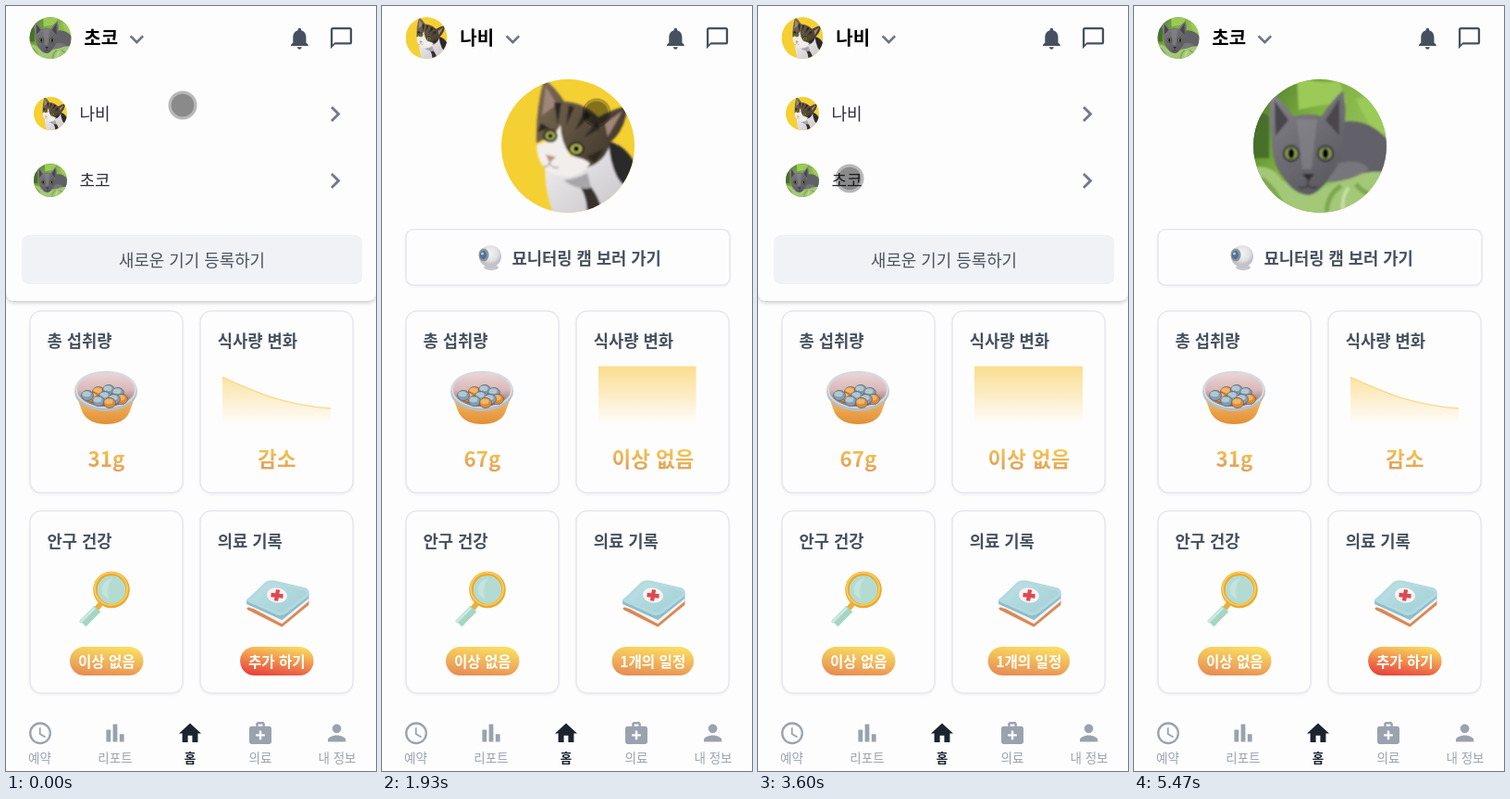
Recreate the animation shown at these times as an HTML page. Size 400 by 825 pixels, loop 6.74 s.

```html
<!DOCTYPE html>
<html lang="ko">
<head>
<meta charset="utf-8">
<title>고양이 홈</title>
<style>
  html, body { margin: 0; width: 100%; height: 100%; overflow: hidden; background: #fefdfe; }
  svg.stage { display: block; width: 100%; height: 100%; }
  text { font-family: "Noto Sans CJK KR", "Noto Sans KR", "Noto Sans CJK", sans-serif; }
  .bold { font-weight: 700; }
  .mid { text-anchor: middle; }
  .title { font-size: 17.7px; font-weight: 700; fill: #47505c; }
  .row { font-size: 18px; font-weight: 500; fill: #2b313a; }
  .value { font-size: 22.4px; font-weight: 700; text-anchor: middle; fill: url(#gold); }
  .pill { font-size: 15.6px; font-weight: 700; text-anchor: middle; fill: #fff; }
  .nav { fill: #9aa2ae; }
  .nav text { font-size: 13.5px; text-anchor: middle; }
  .nav .on { fill: #1c2430; font-weight: 700; }
  .card { fill: #fefdfe; stroke: #e6e7ee; stroke-width: 1.5; }
</style>
</head>
<body>
<svg class="stage" viewBox="0 0 400 825">
  <defs>
    <linearGradient id="gold" x1=".6" y1="0" x2=".4" y2="1"><stop offset=".2" stop-color="#f5c750"/><stop offset="1" stop-color="#df9a5b"/></linearGradient>
    <linearGradient id="pillGold" x1=".7" y1="0" x2=".4" y2="1"><stop stop-color="#fade60"/><stop offset="1" stop-color="#e88f55"/></linearGradient>
    <linearGradient id="pillRed" x1=".75" y1="0" x2=".35" y2="1"><stop stop-color="#f9da5c"/><stop offset="1" stop-color="#e8463f"/></linearGradient>
    <linearGradient id="area" x1="0" y1="0" x2="0" y2="1"><stop stop-color="#fbdd8e"/><stop offset="1" stop-color="#fbdd8e" stop-opacity="0"/></linearGradient>
    <linearGradient id="bowl" x1="0" y1="0" x2="0" y2="1"><stop stop-color="#f4bd69"/><stop offset="1" stop-color="#e38f35"/></linearGradient>
    <linearGradient id="inside" x1="0" y1="0" x2="0" y2="1"><stop stop-color="#ecd3d5"/><stop offset=".5" stop-color="#d9b9ba"/><stop offset="1" stop-color="#7f6660"/></linearGradient>
    <linearGradient id="kit" x1="0" y1="0" x2="1" y2="1"><stop stop-color="#bfe2e5"/><stop offset="1" stop-color="#9fced6"/></linearGradient>
    <linearGradient id="fur" x1="0" y1="0" x2=".6" y2="1"><stop stop-color="#85848a"/><stop offset="1" stop-color="#5b5a60"/></linearGradient>
    <linearGradient id="tabby" x1="0" y1="0" x2="1" y2=".6"><stop stop-color="#7d6d56"/><stop offset="1" stop-color="#43392d"/></linearGradient>
    <linearGradient id="chest" x1="0" y1="0" x2="1" y2="1"><stop stop-color="#f4f2f2"/><stop offset="1" stop-color="#c3c0c6"/></linearGradient>
    <linearGradient id="leaves" x1="0" y1="0" x2="1" y2=".6"><stop stop-color="#47762a"/><stop offset=".45" stop-color="#7fb040"/><stop offset="1" stop-color="#9cc765"/></linearGradient>
    <radialGradient id="ball" cx=".5" cy=".35"><stop stop-color="#f4f3f5"/><stop offset=".7" stop-color="#e0dfe4"/><stop offset="1" stop-color="#c3c2ca"/></radialGradient>
    <filter id="lift" x="-5%" y="0" width="110%" height="110%"><feDropShadow dx="0" dy="2" stdDeviation="2" flood-color="#000" flood-opacity=".2"/></filter>
    <filter id="soft" x="-5%" y="-5%" width="110%" height="115%"><feDropShadow dx="0" dy="1" stdDeviation="1" flood-color="#334" flood-opacity=".07"/></filter>
    <filter id="photo"><feGaussianBlur stdDeviation=".8"/></filter>
    <clipPath id="round"><circle cx="201" cy="151" r="72"/></clipPath>
    <clipPath id="reveal"><rect id="revealBox" x="234" y="380" height="80"/></clipPath>

    <symbol id="nabi" viewBox="129 79 144 144"><g clip-path="url(#round)">
      <path fill="#f4d032" d="M129 79h144v144H129z"/>
      <g filter="url(#photo)">
        <path fill="url(#chest)" d="M176 174Q176 202 186 226H276V172Q262 150 240 148Z"/>
        <path fill="#2b292b" d="M245 146Q264 150 276 174V200Q260 196 254 184Q246 168 245 146Z"/>
        <path fill="#37322f" d="M216 186Q232 196 240 226H222Q222 202 210 190Z"/>
        <path fill="#a9a6aa" d="M196 188Q212 186 222 180L226 196Q214 200 196 188Z"/>
        <path fill="url(#tabby)" d="M175 79Q187 87 197 103Q218 104 234 120Q252 110 265 108Q264 132 247 147Q242 168 222 174L182 140L167 148Q166 112 175 79Z"/>
        <path fill="#a08678" d="M177 87L189 106 173 118ZM260 113L241 127 244 141Z"/>
        <path fill="#2d2721" d="M186 104l4 24 4-24zM202 107l-3 22 9-20zM219 112l-10 22 17-16zM232 125l-14 17 18-10zM172 126l9 6-13 4zM222 162l18-8-10 15z"/>
        <path fill="#f1eeeb" d="M193 128Q193 146 204 162Q220 164 225 170Q214 186 196 184Q178 182 170 166Q166 154 168 149Q184 146 193 128Z"/>
        <g stroke="#2a251e" stroke-width="2.500" fill="#b1bb52"><ellipse cx="182" cy="140" rx="6.500" ry="6"/><ellipse cx="210" cy="154" rx="7.500" ry="6.500"/></g>
        <circle cx="182" cy="140" r="2.600"/><circle cx="210" cy="154" r="3"/>
        <path fill="#c58c86" d="M177 160l11 3-7 6z"/>
        <path fill="none" stroke="#77706c" d="M181 169q-1 5-6 4m6-4q3 7 10 5"/>
      </g>
    </g></symbol>

    <symbol id="choco" viewBox="129 79 144 144"><g clip-path="url(#round)">
      <path fill="url(#leaves)" d="M129 79h144v144H129z"/>
      <g filter="url(#photo)">
        <path fill="#9cca58" d="M176 76q30 10 46 4l8 24q-28 2-52 8zM240 100q20-4 34 8v34q-18-4-34-42z"/>
        <path fill="#47702b" d="M128 120q14-8 18 0v44h-20z"/>
        <path fill="#626167" d="M220 126Q252 118 276 146V184Q240 190 205 182Z"/>
        <path fill="#a3c877" d="M126 174Q150 170 160 188Q190 206 228 186Q252 176 276 180V226H126Z"/>
        <path fill="none" stroke="#7ba750" stroke-width="5" d="M138 186q16 12 24 34M224 194q-14 8-16 28M240 192q8 12 24 12"/>
        <path fill="none" stroke="#c6dfa6" stroke-width="4" d="M134 192q12 10 16 26M232 196q-8 10-6 24"/>
        <path fill="#77767c" d="M212 172Q245 162 254 176Q234 190 207 190Z"/>
        <path fill="url(#fur)" d="M149 94Q160 101 172 119Q188 115 203 119Q214 101 226 91Q231 112 226 140Q228 165 211 185Q200 203 188 204Q172 202 163 187Q148 170 149 142Q144 116 149 94Z"/>
        <path fill="#49464b" d="M152 102l15 21-14 17zM222 100l-15 23 15 17z"/>
        <path fill="#8f8e94" opacity=".5" d="M176 122h22l-6 54h-10z"/>
        <g stroke="#36353a" stroke-width="2.500" fill="#93a354"><circle cx="170" cy="159" r="8"/><circle cx="207" cy="159" r="8"/></g>
        <ellipse cx="170" cy="159" rx="3.500" ry="5.500"/><ellipse cx="207" cy="159" rx="3.500" ry="5.500"/>
        <path fill="#2f2e32" d="M182 181h13l-6.500 8z"/>
        <path fill="none" stroke="#3a393e" stroke-width="1.500" d="M188 189v4q-4 5-10 2m10-2q4 5 10 2"/>
      </g>
    </g></symbol>

    <path id="right" fill="#737a87" d="M10 6L8.59 7.41 13.17 12l-4.58 4.59L10 18l6-6z"/>
  </defs>

  <rect width="400" height="825" fill="#fefdfe"/>

  <!-- header -->
  <use class="avatar" x="25.500" y="12" width="45" height="45"/>
  <text id="name" class="bold" x="84.300" y="42" font-size="20"></text>
  <path fill="#6c7482" transform="translate(126 20.500) scale(1.28)" d="M16.59 8.59L12 13.17 7.41 8.59 6 10l6 6 6-6z"/>
  <g fill="#47505f">
    <path transform="translate(303.200 20.700) scale(1.18)" d="M12 22c1.1 0 2-.9 2-2h-4c0 1.1.89 2 2 2zm6-6v-5c0-3.07-1.64-5.64-4.5-6.32V4c0-.83-.67-1.5-1.5-1.5s-1.5.67-1.5 1.5v.68C7.63 5.36 6 7.92 6 11v5l-2 2v1h16v-1l-2-2z"/>
    <path transform="translate(348.600 20.700) scale(1.16)" d="M20 2H4c-1.1 0-2 .9-2 2v18l4-4h14c1.1 0 2-.9 2-2V4c0-1.1-.9-2-2-2zm0 14H6l-2 2V4h16v12z"/>
  </g>

  <!-- photo and camera link -->
  <use class="avatar" x="129" y="79" width="144" height="144"/>
  <rect class="card" filter="url(#soft)" x="26" y="241" width="350" height="60" rx="8"/>
  <ellipse cx="118" cy="282" rx="8" ry="3" fill="#c6c5cd"/>
  <circle cx="117" cy="270" r="12" fill="url(#ball)"/>
  <ellipse cx="110" cy="268.500" rx="5.500" ry="7" fill="#8c949f"/>
  <ellipse cx="109.500" cy="268.500" rx="3.500" ry="4.500" fill="#4f7192"/><circle cx="108.500" cy="267" r="1.500" fill="#a9d4ee"/>
  <text class="title" x="140.500" y="278.500">묘니터링 캠 보러 가기</text>

  <text id="loading" x="74" y="349" font-size="18" fill="#47505c">로딩 중...</text>

  <g id="cards">
    <g class="card" filter="url(#soft)">
      <rect x="26" y="329" width="165" height="196" rx="12"/><rect x="210" y="329" width="165" height="196" rx="12"/>
      <rect x="26" y="544.500" width="165" height="196.500" rx="12"/><rect x="210" y="544.500" width="165" height="196.500" rx="12"/>
    </g>
    <text class="title" x="44.500" y="368">총 섭취량</text>
    <text class="title" x="228.700" y="368">식사량 변화</text>
    <text class="title" x="44.500" y="583.500">안구 건강</text>
    <text class="title" x="228.700" y="583.500">의료 기록</text>

    <!-- bowl -->
    <path fill="url(#bowl)" d="M76 420L83 439Q90 451 108 451Q127 451 133 439L140 420Z"/>
    <ellipse cx="108" cy="415.500" rx="34" ry="21.500" fill="#b3bfca"/>
    <ellipse cx="108" cy="413.500" rx="33.500" ry="20" fill="#d6d9e0"/>
    <ellipse cx="108" cy="414" rx="31" ry="18" fill="url(#inside)"/>
    <g id="kibble"></g>
    <text id="amount" class="value" x="108.500" y="496.500"></text>

    <!-- chart -->
    <g clip-path="url(#reveal)">
      <path id="flat" fill="url(#area)" d="M234 388.500H351V452H234Z"/>
      <g id="falling">
        <path fill="url(#area)" opacity=".8" d="M234 400C266 415 298 430 351 434V452H234Z"/>
        <path fill="none" stroke="#fad888" stroke-width="1.300" d="M234 400C266 415 298 430 351 434"/>
      </g>
    </g>
    <text id="change" class="value" x="292.900" y="496.500"></text>

    <!-- magnifier -->
    <path stroke="#eab03a" stroke-width="6" d="M102 645L98 650"/>
    <path stroke="#a5d5c5" stroke-width="9.500" d="M99 650L83 666"/>
    <path stroke="#c8eadd" stroke-width="3" d="M96 649L80 665"/>
    <circle cx="114" cy="629.500" r="17.500" fill="#b4dbd2" stroke="#e9a92f" stroke-width="4.500"/>
    <circle cx="113.500" cy="628.500" r="17.500" fill="none" stroke="#f7cc58" stroke-width="2"/>
    <path fill="#cfe9e2" opacity=".6" d="M104 634Q102 620 115 617Q108 624 111 640Z"/>
    <rect x="69" y="691" width="79.500" height="31" rx="15.500" fill="url(#pillGold)"/>
    <text class="pill" x="108.800" y="712.500">이상 없음</text>

    <!-- first aid kit -->
    <g stroke-linejoin="round" stroke-width="3">
      <path fill="#d98a55" stroke="#d98a55" d="M262 650L298 668 326 645V640L298 660Z"/>
      <path fill="#f6f3f4" stroke="#f6f3f4" d="M261.500 645L298 664.500 326 641V638L298 658Z"/>
      <path fill="#8bbfcb" stroke="#8bbfcb" d="M261.500 641L298 657 326 634V638L298 660.500 261.500 644Z"/>
      <path fill="url(#kit)" stroke="#b3dae0" d="M261.500 641Q266 637 281 622.500Q285 620 290 621L324 629Q328 632 325 636L303 653Q298 657 293 655Z"/>
    </g>
    <ellipse cx="293" cy="635.500" rx="11" ry="8" fill="#f8f3f3" transform="rotate(8 293 635.500)"/>
    <path stroke="#dc4a50" stroke-width="4.300" d="M286.500 635L299.500 636.500M294 629.500L292 641.500"/>
    <rect id="recordPill" y="691" height="31" rx="15.500"/>
    <text id="record" class="pill" x="292.800" y="712.500"></text>
  </g>

  <!-- bottom navigation -->
  <g class="nav">
    <g transform="translate(22.600 769.900) scale(1.2)"><circle cx="12" cy="12" r="9" fill="none" stroke="#9aa2ae" stroke-width="1.900"/><path d="M11 7h1.500v5.250l4.500 2.670-.75 1.230L11 13z"/></g>
    <path transform="translate(103.600 769.600) scale(1.2)" d="M4 9h4v11H4zm12 4h4v7h-4zm-6-9h4v16h-4z"/>
    <path class="on" transform="translate(184.600 770) scale(1.2)" d="M10 20v-6h4v6h5v-8h3L12 3 2 12h3v8z"/>
    <path transform="translate(260.600 769.600) scale(1.2)" d="M20 6h-4V4c0-1.1-.9-2-2-2h-4c-1.1 0-2 .9-2 2v2H4c-1.1 0-2 .9-2 2v12c0 1.1.9 2 2 2h16c1.1 0 2-.9 2-2V8c0-1.1-.9-2-2-2zM10 4h4v2h-4zM16 15h-3v3h-2v-3H8v-2h3v-3h2v3h3z"/>
    <path transform="translate(343.200 769.600) scale(1.2)" d="M12 12c2.210 0 4-1.790 4-4s-1.790-4-4-4-4 1.790-4 4 1.790 4 4 4zm0 2c-2.670 0-8 1.340-8 4v2h16v-2c0-2.660-5.330-4-8-4z"/>
    <text x="36.500" y="816">예약</text><text x="118" y="816">리포트</text><text class="on" x="199" y="816">홈</text><text x="275" y="816">의료</text><text x="358" y="816">내 정보</text>
  </g>

  <!-- cat picker -->
  <g id="menu">
    <path filter="url(#lift)" fill="#fefdfe" d="M0 68H400V308Q400 318 390 318H10Q0 318 0 308Z"/>
    <rect id="highlight" x="17" width="368" height="64" rx="8" fill="#e6e8eb"/>
    <use href="#nabi" x="30" y="98" width="36" height="36"/><text class="row" x="79.500" y="123">나비</text>
    <use href="#right" transform="translate(338.800 99.500) scale(1.42)"/>
    <use href="#choco" x="30" y="170" width="36" height="36"/><text class="row" x="79.500" y="195">초코</text>
    <use href="#right" transform="translate(338.800 171.500) scale(1.42)"/>
    <rect x="17" y="247" width="368" height="53" rx="8" fill="#f0f2f5"/>
    <text class="mid" x="201" y="280.500" font-size="17.900" font-weight="500" fill="#4a525f">새로운 기기 등록하기</text>
  </g>

  <g id="cursor"><circle r="15.500" opacity=".27"/><circle r="12.300" opacity=".25"/></g>
</svg>
<script>
const LOOP = 6740;
const $ = id => document.getElementById(id);
const clamp = x => Math.min(1, Math.max(0, x));
const smooth = x => x * x * (3 - 2 * x);
const ramp = (t, start, length) => clamp((t - start) / length);

const cats = {
  nabi: { name: '나비', amount: '67g', change: '이상 없음', record: '1개의 일정', pillWidth: 88.5, pill: 'pillGold', rowY: 84 },
  choco: { name: '초코', amount: '31g', change: '감소', record: '추가 하기', pillWidth: 79.5, pill: 'pillRed', rowY: 156 }
};
const pickNabi = 690, closeNabi = 920, loaded = 1000;
const openMenu = 2680, closeChoco = 3915, redraw = 3970;
const cursorPath = [[0, 191, 107], [70, 191, 107], [520, 89, 117], [1130, 89, 117], [1560, 225, 120],
  [1930, 232, 115], [2440, 147, 42], [3000, 147, 42], [3520, 99, 186], [LOOP, 99, 186]];

// The standard "ease" curve, cubic-bezier(.25, .1, .25, 1).
function ease(x) {
  const bezier = (u, a, b) => 3 * u * (1 - u) * ((1 - u) * a + u * b) + u ** 3;
  let low = 0, high = 1;
  for (let i = 0; i < 20; i++) {
    const u = (low + high) / 2;
    if (bezier(u, .25, .25) < x) low = u; else high = u;
  }
  return bezier(high, .1, 1);
}

function cursorAt(t) {
  const i = cursorPath.findIndex(p => p[0] > t);
  const [t0, x0, y0] = cursorPath[i - 1], [t1, x1, y1] = cursorPath[i];
  const k = smooth((t - t0) / (t1 - t0));
  return [x0 + (x1 - x0) * k, y0 + (y1 - y0) * k];
}

function showCat(key) {
  const cat = cats[key];
  for (const use of document.querySelectorAll('.avatar')) use.setAttribute('href', '#' + key);
  for (const field of ['name', 'amount', 'change', 'record']) $(field).textContent = cat[field];
  const pill = $('recordPill');
  pill.setAttribute('x', 292.8 - cat.pillWidth / 2);
  pill.setAttribute('width', cat.pillWidth);
  pill.setAttribute('fill', `url(#${cat.pill})`);
  $('flat').style.display = key === 'nabi' ? '' : 'none';
  $('falling').style.display = key === 'choco' ? '' : 'none';
  $('highlight').setAttribute('y', cat.rowY);
}

const kibble = [[100, 416], [111, 414], [121, 417], [94, 422], [88, 420], [107, 421], [125, 424], [117, 424], [100, 426], [112, 428]];
$('kibble').innerHTML = kibble.map(([x, y], i) => {
  const [base, shine] = i % 3 ? ['#7f9fb5', '#aec8d8'] : ['#d98c3c', '#f0b566'];
  return `<ellipse cx="${x}" cy="${y}" rx="6.5" ry="5.5" fill="${base}" stroke="#6f5a52" stroke-width=".7"/><ellipse cx="${x - 1}" cy="${y - 1.5}" rx="4.5" ry="3" fill="${shine}"/>`;
}).join('');

let shown;
function draw(t) {
  const key = t >= pickNabi && t < closeChoco ? 'nabi' : 'choco';
  if (key !== shown) showCat(shown = key);

  const loading = t >= pickNabi && t < loaded;
  $('loading').style.display = loading ? '' : 'none';
  $('cards').style.display = loading ? 'none' : '';

  const chartStart = t < pickNabi ? -1500 : t < closeChoco ? loaded : redraw;
  $('revealBox').setAttribute('width', 117.5 * ease(ramp(t, chartStart, 1500)));

  const open = t < openMenu ? 1 - smooth(ramp(t, closeNabi, 200))
    : t < closeChoco ? smooth(ramp(t, openMenu, 200))
    : 1 - smooth(ramp(t, closeChoco, 200));
  $('menu').setAttribute('transform', `translate(0 ${67 * (1 - open)}) scale(1 ${Math.max(open, .001)})`);
  $('menu').style.opacity = open;
  const pressed = t < openMenu ? closeNabi : closeChoco;
  $('highlight').style.opacity = ramp(t, pressed, 80);

  $('cursor').setAttribute('transform', `translate(${cursorAt(t)})`);
  $('cursor').style.opacity = 1 - ramp(t, 4680, 150);
}

const begin = performance.now();
function tick() {
  draw((performance.now() - begin) % LOOP);
  requestAnimationFrame(tick);
}
tick();
</script>
</body>
</html>
```
